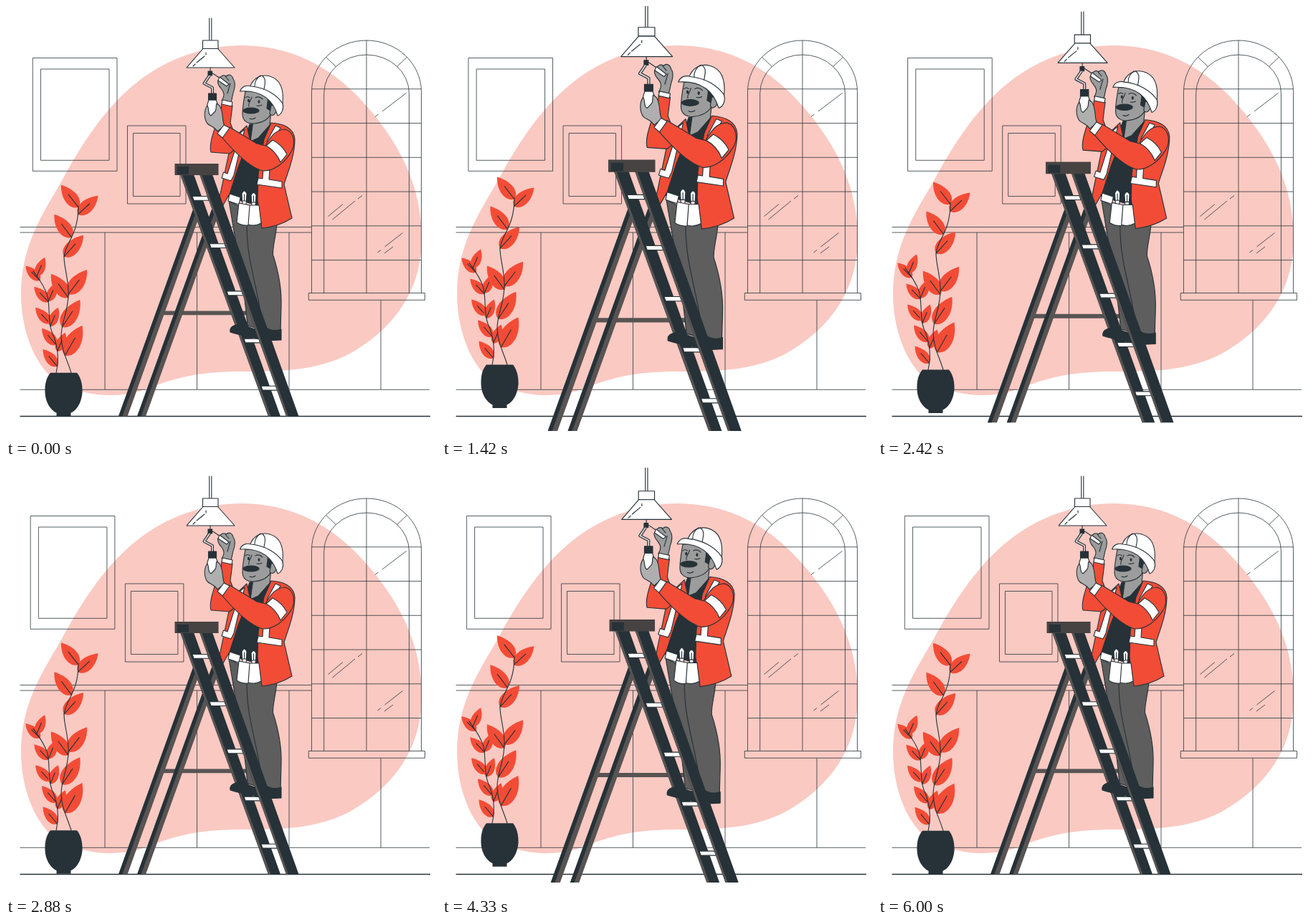
Animation, 600 px wide and 600 px high, one loop 6.04 s. Source, as an HTML page:

```html
<!DOCTYPE html>
<html lang="en">
<head>
<meta charset="utf-8">
<title>Electrician on a ladder</title>
<style>
html, body { margin: 0; width: 100%; height: 100%; overflow: hidden; background: #fff; }
svg { display: block; width: 100vw; height: 100vh; }
.line { fill: none; stroke: #263238; stroke-width: 1; stroke-opacity: .78; }
.ink { stroke: #263238; stroke-width: 1.1; stroke-linejoin: round; stroke-linecap: round; }
.none { fill: none; }
.dark { fill: #263238; }
.grey { fill: #585453; }
.red { fill: #f34c36; }
.white { fill: #fff; }
.skin { fill: #afafaf; }
.shade { fill: #9c9c9c; }
</style>
</head>
<body>
<svg viewBox="0 0 600 600" xmlns="http://www.w3.org/2000/svg">
  <path fill="#fac9c2" d="M330 55C420 56 478 105 520 160C560 212 580 265 580 325C580 388 550 446 478 486C436 507 395 510 330 510C250 510 225 525 185 538C130 552 85 535 60 515C32 485 21 440 21 402C21 330 55 285 80 240C120 165 160 120 200 94C240 68 285 55 330 55Z"/>

  <g class="line">
    <path d="M19.5 308.5H426M19.5 316H426M138 316V535M266.5 316V535M395 316V535M523 410.5V535M19.5 535.3H591"/>
    <path d="M426.5 400.5V119.5a76.5 71.5 0 0 1 153 0V400.5M443.7 400.5V122a59.4 54 0 0 1 118.8 0V400.5M503 48V400.5"/>
    <path id="bars"/>
    <path d="M446 71L461 85M560 71L545 85M422.3 400.5H584.5V410.3H422.3Z"/>
    <path d="M525 147L558.5 121.5M515 154.5L519.5 151M449.5 293.5L470 276.5M455.5 298L487 272M491 269L497 264.5M518.5 344L523 340.5M528.5 336L553.5 316.5M528 345L540 336"/>
  </g>
  <path class="none" stroke="#263238" stroke-width="1.3" d="M19.5 572.5H592"/>

  <g id="pictures" class="line">
    <path d="M37.3 72.5H155V230.3H37.3ZM48.5 88H144V215.3H48.5Z"/>
    <path d="M169.5 167H251V276H169.5ZM177.5 177.5H243V265.5H177.5Z"/>
  </g>

  <g id="plant">
    <g id="leaves"></g>
    <g class="ink none">
      <path id="tallStem" d="M91 512C86 495 77 480 77 461C77 440 88 425 87 398C86 375 81 365 81 350C83 330 101 320 101 279"/>
      <path id="shortStem" d="M70 512C75 490 71 470 64 455C58 440 62 415 57 402C52 388 45 380 38 370"/>
    </g>
    <path class="dark" d="M62 512H99C105 519 107 530 106.5 540C105 555 98 565 90.5 568V572.5H70.5V568C62 564 55 553 54.5 540C54 528 56 519 62 512Z"/>
  </g>

  <g id="worker">
    <!-- rear ladder legs -->
    <path class="grey" d="M218 425.5H336V431.3H218Z"/>
    <path class="grey" d="M157 572.5L261 284H273L169.5 572.5ZM183 572.5L287 284H299L195 572.5Z"/>
    <path class="dark" d="M157 572.5L261 284H266.5L162.5 572.5ZM183 572.5L287 284H292.5L188.5 572.5Z"/>

    <!-- front ladder, far rail and rungs -->
    <path class="dark" d="M243 235H262L383 572.5H366Z"/>
    <path class="grey" d="M243 235H246L369.5 572.5H366Z"/>
    <path id="rungs" class="ink white"/>

    <!-- legs -->
    <g class="ink">
      <path fill="#5e5e5e" d="M311 272L346 290L358 452L337 446C333 400 324 350 311 272Z"/>
      <path fill="#5e5e5e" d="M336 303L378 303C377 320 372 335 372.5 347C380 370 385 395 384 420L383 455H359C356 420 347 390 340 352C337 335 336 320 336 303Z"/>
      <path class="dark" d="M313 455C311 446 324 442 335 446C345 452 352 452 360 447C368 453 376 454 384 451V466L362 467C345 462 328 460 313 455Z"/>
    </g>

    <!-- torso -->
    <g class="ink">
      <path class="dark" d="M340 165L368 162L366 200L352 240L356 280L310 266L318 225Z"/>
      <path class="shade" d="M345 160L341 189L352 184L368 166L370 146Z"/>
      <path class="red" d="M318 184L336 167L340 185L324 225L312 262L300 283Q294 276 298 267L311 205Z"/>
      <path class="white" d="M327 177L333 172L318 236L314 244L301 240L303.5 232L309 234Z"/>
      <path class="red" d="M370 163C388 164 402 171 403 186C403 210 392 235 388 249L399 296Q380 308 357 310L351 270L352 235L360 186Z"/>
      <path class="white" d="M376 167L383 170L372 190L364 189ZM359 226H368L367 242L385 245V254L350 249L352 240L358 241Z"/>
    </g>

    <!-- belt and tools -->
    <g class="ink white">
      <path d="M312 262L327 267L325 277L310 272Z"/>
      <path d="M330 278L329 262Q332.5 254 336 262L335 278ZM343 279L342 264Q345.500 257 349 264L348 279Z"/>
      <path d="M332.5 263V272M345.5 265V274M328 272H338M341 274H351"/>
      <path d="M325 275L340 278L338 306Q329 307 322 302ZM340 278L353 278L356 303Q347 308 338 305Z"/>
    </g>

    <!-- lamp -->
    <g class="ink white">
      <path d="M283.7 17V48M286.8 17V48"/>
      <path d="M274.5 48H296V59.5H274.5Z"/>
      <path d="M275 59.5H295.5L319 86H252Z"/>
      <path d="M279 65V68M277 70L266 79M264 81L261 84M285 86V92"/>
      <path class="dark" d="M282 91H287.5V97H282Z"/>
    </g>
    <path class="none" stroke="#263238" stroke-width="4" stroke-linejoin="round" d="M284 97L276.5 108L288 114V123"/>
    <path class="none" stroke="#d8d3d1" stroke-width="1.8" stroke-linejoin="round" d="M284 97L276.5 108L288 114V123"/>

    <!-- far arm with screwdriver -->
    <g class="ink">
      <path class="red" d="M301 136L316 139L313 163L325 195L312 206L286 204C283 194 289 178 293 165L299 156Z"/>
      <path class="shade" d="M301 132C306 124 304 120 300 115C296 111 294 104 297 103C299 98 303 95 307 98C312 94 316 97 317 102C321 107 319 116 317 121L314 135Z"/>
      <path class="white" d="M302 131L316 134L315 140L301 137Z"/>
      <path class="none" d="M287 93L299 101M313 108L309 122M306 98L311 104"/>
      <path class="white" d="M298 99L311 109L308 112L296 104Z"/>
    </g>

    <!-- head -->
    <g class="ink">
      <path class="shade" d="M334 119C332 130 330 140 330 151C330 161 338 165 346 164C357 163 367 158 371 148L379 140L377 120Z"/>
      <path class="dark" d="M364 124C367 131 364 138 364 143L369 146L372 136L378 147L380 133Z"/>
      <path class="shade" d="M370 139C376 136 379 143 376 149C374 153 370 154 368 150Z"/>
      <ellipse class="dark" cx="342" cy="146" rx="11" ry="4"/>
      <path class="none" d="M343 127C342 132 337 137 339 140M334 128Q337 125 340 128M348 128Q353 125 358 130M340 157Q344 159 348 156M350 139Q354 140 357 138"/>
      <ellipse class="dark" cx="338.5" cy="132" rx="1" ry="1.8"/>
      <ellipse class="dark" cx="353" cy="133.5" rx="1" ry="1.8"/>
      <path class="white" d="M340 114C345 99 357 95 368 98C382 102 388 115 386 136L380 143C372 128 358 119 340 114Z"/>
      <path class="white" d="M326.500 119C329 112 336 110 342 112C362 114 378 124 386 136C388 143 385 151 379 153C373 133 358 117 326.500 119Z"/>
      <path class="none" d="M355 97C349 101 347 106 347 112M357 97C364 102 361 109 360 116"/>
    </g>

    <!-- near arm with bulb -->
    <g class="ink">
      <path class="red" d="M301 183L312 169L350 192L362 195C370 180 378 172 390 172C404 177 404 195 397 205C388 220 372 231 358 230C340 225 318 203 301 183Z"/>
      <path class="white" d="M363 195L372 187C382 192 388 199 392 207L383 218C379 208 372 200 363 195Z"/>
      <path class="white" d="M283 131H293L299 146C299 153 290 158 283 154C278 150 279 142 283 131Z"/>
      <path class="dark" d="M282.5 122H293.5V131H282.5Z"/>
      <path class="skin" d="M281 139C276 145 276 157 281 164C285 168 291 168 295 175L305 167C301 161 304 148 298 139L294 136C292 140 295 144 291 148L286 153C281 151 284 144 281 139Z"/>
      <path class="white" d="M295 178L304 166L312 170L302 184Z"/>
    </g>

    <!-- front ladder, near rail and top -->
    <path class="dark" d="M270 235H288L408.5 572.5H391Z"/>
    <path class="grey" d="M270 235H273L394 572.5H391Z"/>
    <path fill="#474342" d="M235.5 220H296.5V236H235.5Z"/>
    <path class="dark" d="M239 224H255V235H239Z"/>
  </g>
</svg>
<script>
const $ = id => document.getElementById(id);
const repeat = (count, make) => Array.from({ length: count }, (_, i) => make(i)).join('');

$('bars').setAttribute('d', repeat(6, i => `M426.5 ${115.8 + i * 47.75}h153`));
$('rungs').setAttribute('d', repeat(5, i => `M${260 + i * 24} ${265.5 + i * 66.2}h21l2 5.8h-21Z`));

// Point of an upward-growing stem at height y
function stemPoint(stem, y) {
  let low = 0, high = stem.getTotalLength();
  for (let i = 0; i < 20; i++) {
    const mid = (low + high) / 2;
    if (stem.getPointAtLength(mid).y > y) low = mid; else high = mid;
  }
  return stem.getPointAtLength(low);
}

function leaf(stem, y, dx, dy) {
  const base = stemPoint(stem, y);
  const out = Math.sign(dx);
  const at = (along, side) =>
    `${base.x + dx * along + dy * side * out} ${base.y + dy * along - dx * side * out}`;
  return `<path class="red" d="M${at(0, 0)}C${at(.1, .3)} ${at(.55, .32)} ${at(1, 0)}C${at(.6, -.34)} ${at(.1, -.3)} ${at(0, 0)}Z"/>
    <path class="ink none" d="M${at(0, 0)}L${at(.58, 0)}"/>`;
}

// Leaves grow longer and steeper toward the pot
const tall = $('tallStem'), short = $('shortStem');
$('leaves').innerHTML =
  repeat(3, i => leaf(tall, 281 + 21 * i * (i + 1), -24, -31 - i)) +
  repeat(5, i => leaf(tall, 291 + 62 * i - 3.2 * i * i, 28 - i, -26 - 4 * i)) +
  repeat(5, i => leaf(short, 383 + 30 * i, -20, -20 - i)) +
  repeat(4, i => leaf(short, 377 + 35 * i, 11, -26));

const LOOP = 6040, STEP = 1000 / 24;
const clamp = x => Math.max(0, Math.min(1, x));

// Linear rise from start to peak, then fall to end
const pulse = (t, start, peak, end) =>
  clamp(Math.min((t - start) / (peak - start), (end - t) / (end - peak)));

// Swing reached at the k-th tenth of the cycle: doubling, then halving again
const swing = k => (-1) ** k * 1.2 * Math.min(4, Math.floor(2 ** (Math.min(k, 10 - k) - 1)));

function shake(t) {
  const k = Math.floor(t / 600);
  return swing(k) + (swing(k + 1) - swing(k)) * (t / 600 - k);
}

function render(ms) {
  const t = (Math.floor((ms % LOOP + 5) / STEP) % 144 + .5) * STEP;
  const lift = 12 * pulse(t % 3000, 0, 1500, 3000);
  const scale = 1 + .1 * (pulse(t, 920, 1620, 2820) + pulse(t, 3380, 3980, 4620));
  $('pictures').setAttribute('transform', `translate(${shake(t)} 0)`);
  $('plant').setAttribute('transform', `translate(0 ${-lift})`);
  $('worker').setAttribute('transform', `translate(282.8 294.7) scale(${scale}) translate(-282.8 -294.7)`);
}

const start = performance.now();
function tick() {
  render(performance.now() - start);
  requestAnimationFrame(tick);
}
tick();
</script>
</body>
</html>
```
